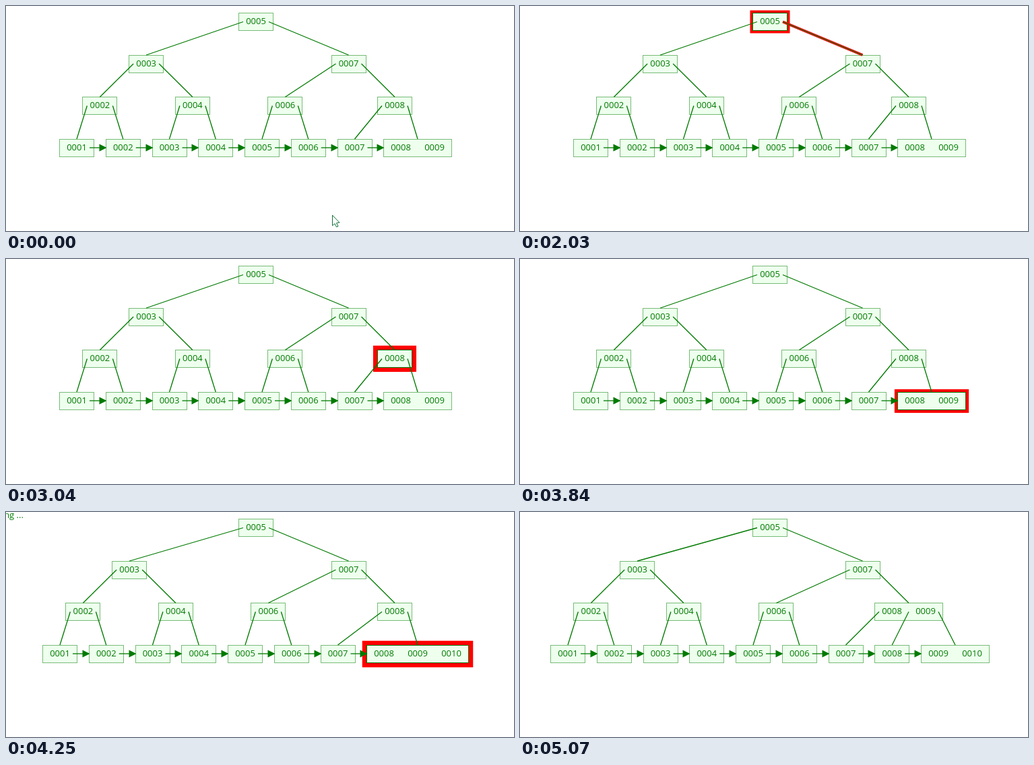
Write an HTML page with a canvas that moves like this. It is 754 px wide and 335 px high and loops after 6.08 s.

```html
<!DOCTYPE html>
<html lang="en">
<head>
<meta charset="utf-8">
<title>Tree insertion</title>
<style>
  html, body { margin: 0; width: 100%; height: 100%; overflow: hidden; background: #fff; }
  canvas { display: block; }
</style>
</head>
<body>
<canvas id="stage" width="754" height="335"></canvas>
<script>
const ctx = document.getElementById('stage').getContext('2d');
const LOOP = 6080, GREEN = '#007a00', RED = '#ff0000';
const BEGIN = 1386, TICK = 203.4;    // the search advances in even ticks
const LEVELS = [0, 4, 7, 11, 15];    // tick at which each level lights up; the last ends the search
const SPLIT = 15, GAP = 68.75;       // tick of the split, distance between leaves

const mix = (a, b, p) => a + (b - a) * p;
// 0 to 1 over the two ticks after `from`
const ease = (k, from) => Math.min(1, Math.max(0, (k - from) / 2));

const makeNode = (x, row, keys, kids = []) => ({ x, y: 23.5 + 62.5 * row, keys, kids });
const topOf = n => n.y - 13;
const leftOf = n => Math.floor(n.x - 25 * n.keys.length - 0.5) + 0.5;
// x of the i-th outgoing edge
const portOf = (n, i) => {
  const count = n.keys.length;
  return n.x + (i - count / 2) * 50 + (i === 0 ? 6 : i === count ? -6 : 0);
};

function buildTree(k) {
  const split = k >= SPLIT, p = ease(k, SPLIT - 1);
  const base = 105 - 25 * ease(k, 12) - 9 * p;
  const leaves = Array.from({ length: 7 }, (_, i) => makeNode(base + GAP * i, 3, [i + 1]));
  if (split) leaves.push(makeNode(mix(611, 552.25, p), 3, [8]), makeNode(mix(636, 646, p), 3, [9, 10]));
  else leaves.push(makeNode(611, 3, k < 13 ? [8, 9] : [8, 9, 10]));

  const pair = i => makeNode(base + GAP * (i + 0.5), 2, [i + 2], leaves.slice(i, i + 2));
  const n3 = makeNode(base + GAP * 1.5, 1, [3], [pair(0), pair(2)]);
  const n8 = makeNode(577, 2, split ? [8, 9] : [8], leaves.slice(6));
  const n7 = makeNode(508.5, 1, [7], [pair(4), n8]);
  const root = makeNode(371, 0, [5], [n3, n7]);
  return { root, leaves, path: [root, n7, n8, leaves[7]] };
}

function line(x1, y1, x2, y2, color = GREEN, width = 1.3) {
  ctx.strokeStyle = color;
  ctx.lineWidth = width;
  ctx.beginPath();
  ctx.moveTo(x1, y1);
  ctx.lineTo(x2, y2);
  ctx.stroke();
}

function polygon(points, fill) {
  ctx.beginPath();
  points.forEach(([x, y]) => ctx.lineTo(x, y));
  ctx.closePath();
  ctx.fillStyle = fill;
  ctx.fill();
}

function drawBox(n, glow) {
  const x = leftOf(n), y = Math.floor(topOf(n)) + 0.5, w = 50 * n.keys.length + 1;
  if (glow) {
    ctx.fillStyle = RED;
    ctx.fillRect(x - glow, y - glow, w + 2 * glow, 26 + 2 * glow);
  }
  ctx.fillStyle = '#eeffee';
  ctx.fillRect(x, y, w, 26);
  ctx.strokeStyle = glow ? GREEN : '#77bb77';
  ctx.lineWidth = 1;
  ctx.strokeRect(x, y, w, 26);
  ctx.fillStyle = GREEN;
  n.keys.forEach((key, i) =>
    ctx.fillText(String(key).padStart(4, '0'), n.x + 50 * (i - (n.keys.length - 1) / 2), n.y + 3.7));
}

function drawArrow(from, to) {
  const tip = leftOf(to) + 1, y = from.y;
  line(portOf(from, from.keys.length), y, tip - 5, y);
  polygon([[tip, y], [tip - 11, y - 5.5], [tip - 11, y + 5.5]], GREEN);
}

function drawPointer(x, y) {
  polygon([[0.5, 0.5], [0.5, 16], [4, 13], [6.5, 18], [9, 17], [6.5, 12], [11, 11.5]]
    .map(([a, b]) => [x + a, y + b]), '#fff');
  ctx.strokeStyle = '#12703a';
  ctx.lineWidth = 1;
  ctx.stroke();
}

function draw(time) {
  const k = Math.floor((time - BEGIN) / TICK);
  const { root, leaves, path } = buildTree(k);
  const level = LEVELS.findLastIndex(from => k >= from);
  const hot = path[level], next = path[level + 1];
  const lit = k >= LEVELS[level + 1] - 2;      // the edge joins in for the last two ticks
  const glow = 5.5 + 1.5 * Math.cos((k - 7) * 2 * Math.PI / 7.7);
  const visit = (n, fn) => { fn(n); n.kids.forEach(kid => visit(kid, fn)); };

  ctx.fillStyle = '#fff';
  ctx.fillRect(0, 0, 754, 335);
  ctx.font = '13px "Open Sans", "Noto Sans", sans-serif';
  ctx.textAlign = 'center';
  visit(root, n => drawBox(n, n === hot ? glow : 0));
  visit(root, n => n.kids.forEach((kid, i) => {
    const ends = [portOf(n, i), n.y, kid.x, topOf(kid)];
    if (lit && n === hot && kid === next) line(...ends, RED, glow * 0.9);
    line(...ends);
  }));
  leaves.slice(1).forEach((leaf, i) => drawArrow(leaves[i], leaf));

  if (k >= 13 && k < 16) {
    ctx.textAlign = 'right';
    ctx.fillStyle = GREEN;
    ctx.fillText('Splitting ...', 26, 9);
  }
  if (time < 200) drawPointer(484, 311);
  const left = 17 - k;                         // the pointer slows down as it leaves
  if (left >= 0 && left < 3) drawPointer(719 - 110 * left - 15 * left ** 2, 311 - 18.5 * left - 6.5 * left ** 2);
}

const start = performance.now();
function tick() {
  draw((performance.now() - start) % LOOP);
  requestAnimationFrame(tick);
}
tick();
</script>
</body>
</html>
```
